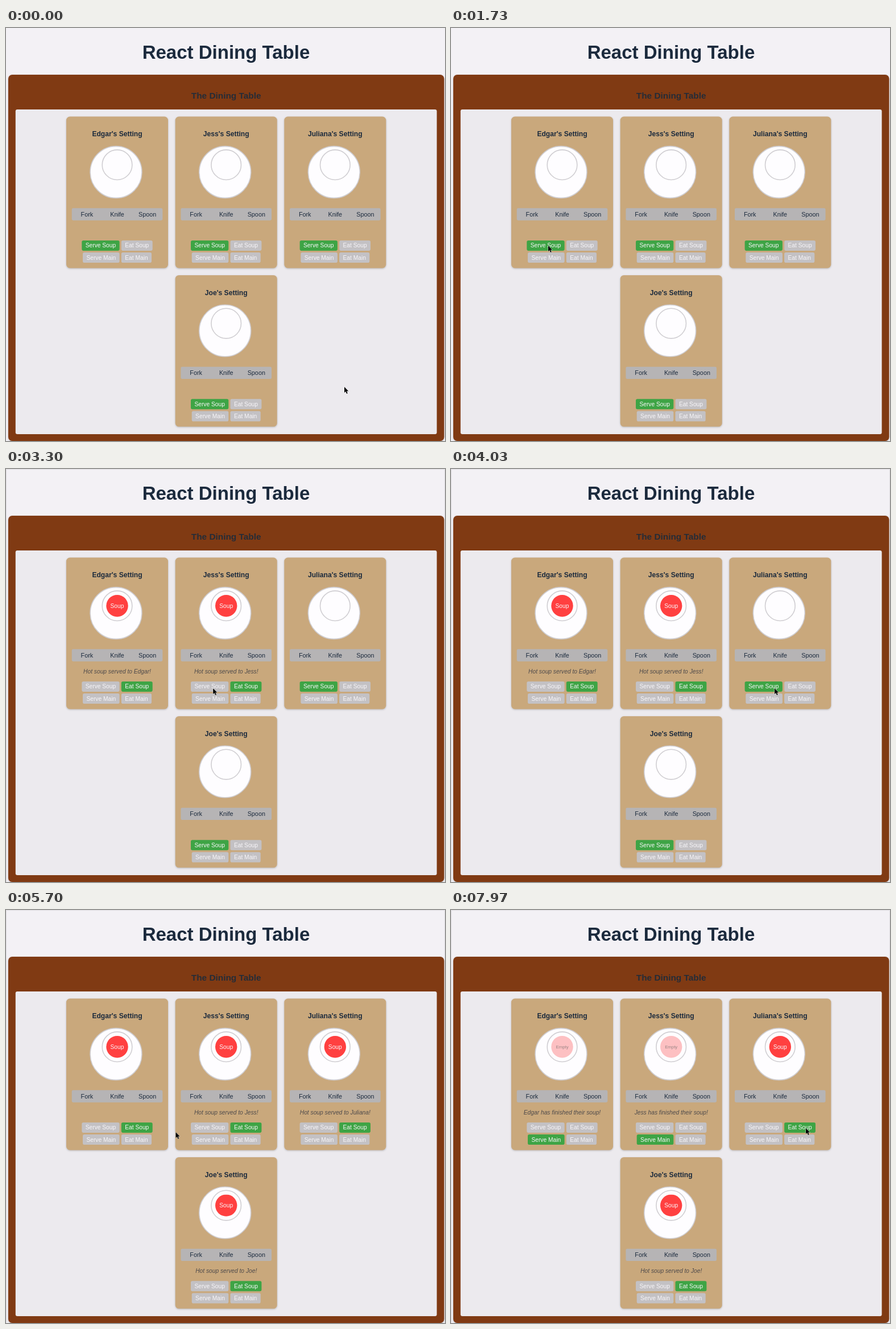
An HTML page for the animation above (8000 ms loop, 772 by 725 pixels).

```html
<!DOCTYPE html>
<html lang="en">
<head>
<meta charset="utf-8">
<title>React Dining Table</title>
<style>
  html, body { margin: 0; width: 100%; height: 100%; overflow: hidden; background: #f3f1f5; }
  svg { display: block; width: 772px; height: 725px; }
  text { font-family: "Liberation Sans", Arial, sans-serif; font-size: 10.24px; fill: #1b2a3d; text-anchor: middle; }
  .title { font-size: 33px; font-weight: bold; }
  .subtitle { font-size: 15.4px; font-weight: bold; fill: #252c37; }
  .name { font-size: 12.1px; font-weight: bold; }
  .tool { font-size: 10.8px; }
  .note { font-style: italic; fill: #4e4a4b; }
  .label { fill: #f8f6f9; }
  .empty { font-size: 7.8px; fill: #9b8586; }
  .dish { fill: #fefdff; stroke: #d0ced2; stroke-width: 1.6; }
  .table, .card { filter: drop-shadow(0 1.6px 1.6px rgba(0, 0, 0, .22)); }
</style>
</head>
<body>
<svg id="stage" viewBox="0 0 772 725"></svg>
<script>
const LOOP = 8000;
const NOTE_TIME = 3000;
const GREEN = '#3ea445', GREY = '#c3c1c4';

// Column centre, vertical shift, guest, and times of the two clicks.
const guests = [
  { x: 195.5, y: 0, name: 'Edgar', served: 1900, eaten: 6060 },
  { x: 387.2, y: 0, name: 'Jess', served: 3010, eaten: 6820 },
  { x: 578.8, y: 0, name: 'Juliana', served: 4150, eaten: LOOP },
  { x: 387.2, y: 278.4, name: 'Joe', served: 5040, eaten: LOOP }
];

// Time, x, y, easing towards the next stop.
const pointerStops = [
  [0, 595, 630, 'linear'],
  [300, 595, 630, 'ease-in-out'],
  [1500, 171, 382, 'linear'],
  [2250, 171, 382, 'ease-in'],
  [2630, 299, 387, 'ease-out'],
  [2860, 362, 385, 'linear'],
  [3250, 362, 385, 'ease-in-out'],
  [3950, 569, 385, 'linear'],
  [4300, 569, 385, 'ease-in-out'],
  [4880, 362, 664, 'linear'],
  [5180, 362, 664, 'ease-in'],
  [5700, 299, 390, 'ease-out'],
  [5920, 229, 385, 'linear'],
  [6180, 229, 385, 'ease-in-out'],
  [6620, 414, 385, 'linear'],
  [7000, 414, 385, 'ease-in-out'],
  [7750, 624, 383, 'linear'],
  [LOOP, 624, 383, 'linear']
];

const stage = document.getElementById('stage');

function add(parent, tag, attrs, text) {
  const el = document.createElementNS('http://www.w3.org/2000/svg', tag);
  for (const key in attrs) el.setAttribute(key, attrs[key]);
  if (text) el.textContent = text;
  return parent.appendChild(el);
}
const rect = (parent, x, y, width, height, rx, fill, cls = '') =>
  add(parent, 'rect', { x, y, width, height, rx, fill, class: cls });
const circle = (parent, cx, cy, r, attrs) =>
  add(parent, 'circle', { cx, cy, r, ...attrs });
const label = (parent, x, y, cls, text) =>
  add(parent, 'text', { x, y, class: cls }, text);

const play = (el, frames) =>
  el.animate(frames, { duration: LOOP, iterations: Infinity });

// Gives a property one value inside [from, to) and another outside it.
function during(el, prop, from, to, inside, outside) {
  const frames = [{ offset: 0, [prop]: from > 0 ? outside : inside }];
  if (from > 0 && from < LOOP) frames.push({ offset: from / LOOP, [prop]: inside });
  if (to < LOOP) frames.push({ offset: to / LOOP, [prop]: outside });
  frames.push({ offset: 1, [prop]: frames[frames.length - 1][prop] });
  play(el, frames.map(f => ({ ...f, easing: 'steps(1, end)' })));
}
const showDuring = (el, from, to) => during(el, 'opacity', from, to, 1, 0);

function button(card, x, y, width, text, from, to) {
  const box = rect(card, x, y, width, 18, 2.8, GREY);
  during(box, 'fill', from, to, GREEN, GREY);
  label(card, x + width / 2, y + 12.5, 'label', text);
}

function note(card, text, from) {
  const el = label(card, 0, 358.8, 'note', text);
  showDuring(el, from, Math.min(from + NOTE_TIME, LOOP));
}

function setting({ x, y, name, served, eaten }) {
  const card = add(stage, 'g', { transform: `translate(${x} ${y})` });
  rect(card, -89.5, 155.6, 179, 265.8, 6.4, '#c9a87c', 'card');
  label(card, 0, 190.2, 'name', `${name}'s Setting`);

  circle(card, -2, 253, 45.4, { class: 'dish' });
  circle(card, 0, 240.2, 26.3, { class: 'dish' });
  const soup = add(card, 'g', {});
  circle(soup, 0, 240.2, 19.2, { fill: '#ff4040' });
  label(soup, 0, 243.9, 'label', 'Soup');
  showDuring(soup, served, eaten);
  const empty = add(card, 'g', {});
  circle(empty, 0, 240.2, 19.2, { fill: '#fdc0c2' });
  label(empty, 0, 242.9, 'empty', 'Empty');
  showDuring(empty, eaten, LOOP);

  rect(card, -79.8, 316.3, 159.6, 21.4, 2.4, '#b6b4b5');
  ['Fork', 'Knife', 'Spoon'].forEach((tool, i) =>
    label(card, (i - 1) * 53.1, 330.7, 'tool', tool));

  note(card, `Hot soup served to ${name}!`, served);
  if (eaten < LOOP) note(card, `${name} has finished their soup!`, eaten);

  button(card, -62.2, 372.9, 66.3, 'Serve Soup', 0, served);
  button(card, 7.3, 372.9, 54.9, 'Eat Soup', served, eaten);
  button(card, -60.5, 394.1, 64.6, 'Serve Main', eaten, LOOP);
  button(card, 7.3, 394.1, 53.2, 'Eat Main', LOOP, LOOP);
}

label(stage, 387, 53.5, 'title', 'React Dining Table');
rect(stage, 4, 82, 766.5, 643, 7, '#803a13', 'table');
label(stage, 387.2, 124.4, 'subtitle', 'The Dining Table');
rect(stage, 16.8, 143, 740.8, 570, 3.2, '#eceaee');
guests.forEach(setting);

const edge = add(stage, 'path', { d: 'M.5 725V.5H771.5V725', fill: 'none', stroke: '#dfdde1' });
showDuring(edge, guests[0].served, LOOP);

const pointer = add(stage, 'path', {
  d: 'M0 0V10.2L2.3 8.1 4 12 5.8 11.2 4.1 7.4H7.3Z',
  fill: '#000', stroke: '#fff', 'stroke-width': .8, 'paint-order': 'stroke'
});
play(pointer, pointerStops.map(([time, x, y, easing]) =>
  ({ offset: time / LOOP, transform: `translate(${x}px, ${y}px)`, easing })));
</script>
</body>
</html>
```
